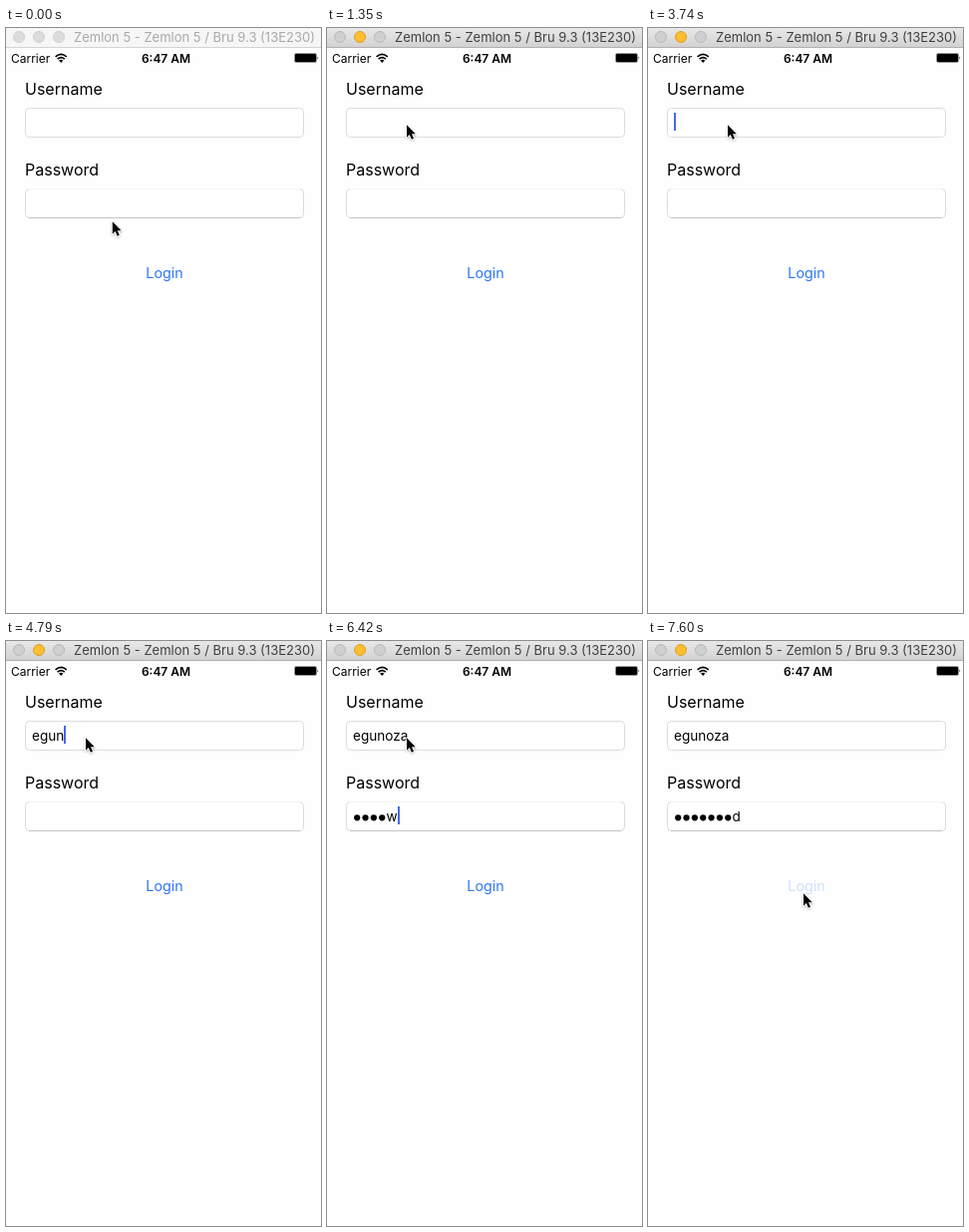
These frames come from a looping animation (316x587 px, 8000 ms). An HTML page:

```html
<!DOCTYPE html>
<html lang="en">
<head>
<meta charset="utf-8">
<title>Login form</title>
<style>
  html, body { margin: 0; width: 100%; height: 100%; overflow: hidden; background: #fefefe; }
  svg { display: block; width: 316px; height: 587px; font-family: Inter, Roboto, sans-serif; }
  text { white-space: pre; }
  .label { font-size: 16px; }
  .input { font-size: 13.6px; }
  .status { font-size: 12px; }
  .field { fill: #fff; stroke: #dcdcdc; }
  .bar-line { fill: #d3d3d3; }
  .title { font-size: 13px; fill: #a9a9a9; }
  .light { fill: #dcdcdc; stroke: #cecece; }
  .active .bar { fill: url(#barFill); }
  .active .bar-line { fill: #b1b1b1; }
  .active .title { fill: #404040; }
  .active .light { fill: #d0d0d0; stroke: #b9b9b9; }
  .active .minimise { fill: #fdbe30; stroke: #dfa023; }
</style>
</head>
<body>
<svg viewBox="0 0 316 587">
  <defs>
    <linearGradient id="barFill" x2="0" y2="1">
      <stop offset="0" stop-color="#e8e8e8"/>
      <stop offset="1" stop-color="#d1d1d1"/>
    </linearGradient>
    <filter id="shadow" x="-50%" y="-50%" width="200%" height="200%">
      <feDropShadow dx="0" dy="1" stdDeviation=".8" flood-opacity=".3"/>
    </filter>
  </defs>
  <rect width="316" height="587" fill="#fefefe"/>

  <g id="window">
    <rect class="bar" width="316" height="20" fill="#f6f6f6"/>
    <rect class="bar-line" y="19" width="316" height="1"/>
    <circle class="light" cx="13" cy="9" r="5.5"/>
    <circle class="light minimise" cx="33" cy="9" r="5.5"/>
    <circle class="light" cx="53" cy="9" r="5.5"/>
    <text class="title" x="68" y="14">Zemlon 5 - Zemlon 5 / Bru 9.3 (13E230)</text>
  </g>

  <g class="status">
    <text x="5" y="34.5">Carrier</text>
    <text x="160.5" y="34.5" text-anchor="middle" font-weight="600">6:47 AM</text>
    <g fill="none" stroke="#000" stroke-width="1.6">
      <path d="M49.6 28.8Q55.2 23.8 60.8 28.8M51.6 31.2Q55.2 28 58.8 31.2"/>
      <path d="M53 32.6Q55.2 30.8 57.4 32.6L55.2 35Z" fill="#000" stroke="none"/>
    </g>
    <rect x="289.5" y="25.5" width="22" height="9" rx="1.5" fill="none" stroke="#999"/>
    <rect x="290" y="26" width="21" height="8" rx="1"/>
    <path d="M312.5 28.5q1.5 1.5 0 3z"/>
  </g>

  <text class="label" x="19" y="67">Username</text>
  <rect class="field" x="19.5" y="80.5" width="279" height="29" rx="4"/>
  <text class="label" x="19" y="148">Password</text>
  <rect class="field" x="19.5" y="161.5" width="279" height="29" rx="4"/>
  <path d="M23 161.5H295" stroke="#f4f4f4"/>
  <path d="M23 190.5H295" stroke="#c3c3c3"/>

  <text id="user" class="input" x="26" y="100"></text>
  <g id="dots"></g>
  <text id="pass" class="input" y="181"></text>
  <rect id="caret" width="2" height="18" fill="#4269ea"/>
  <text id="login" x="159" y="251" text-anchor="middle" font-size="14.3">Login</text>

  <path id="pointer" d="M0 0V12.4L2.8 9.7L4.9 14.4L7 13.4L5 8.9H8.8Z"
    stroke="#fff" stroke-width="1.5" paint-order="stroke" stroke-linejoin="round" filter="url(#shadow)"/>
</svg>

<script>
  const LOOP = 8000, TICK = 149, LEFT = 26, DOT = 8.35;

  // Moments below are counted in ticks.
  const ACTIVATE = 9, FOCUS_USER = 11, TYPE_USER = 20, FOCUS_PASS = 36, TYPE_PASS = 40, PRESS = 51;
  const KEYS = "e....<.e.gu.noza"; // one key per tick: "." waits, "<" deletes
  const SECRET = "password", SECRET_RATE = 4 / 3;

  const REST = [106.8, 194.3], NAME_FIELD = [80, 97.3], BUTTON = [156, 253.3];
  const GLIDE = 5, LEAVE_FIELD = 46;

  const $ = id => document.getElementById(id);
  const [win, user, pass, dots, caret, login, pointer] =
    ["window", "user", "pass", "dots", "caret", "login", "pointer"].map($);

  const clamp = (v, lo, hi) => Math.min(hi, Math.max(lo, v));
  const ease = p => p * p * (3 - 2 * p);

  function set(node, attrs) {
    for (const name in attrs) node.setAttribute(name, attrs[name]);
  }

  function setText(node, text) {
    if (node.textContent !== text) node.textContent = text;
  }

  for (let i = 0; i < SECRET.length - 1; i++) {
    const dot = document.createElementNS("http://www.w3.org/2000/svg", "circle");
    set(dot, { cx: LEFT + DOT * (i + .5), cy: 177.3, r: 3.1 });
    dots.append(dot);
  }

  // Name typed so far and the tick of the latest key.
  function typeName(tick) {
    let text = "", last = FOCUS_USER;
    [...KEYS].forEach((key, i) => {
      if (key === "." || TYPE_USER + i > tick) return;
      text = key === "<" ? text.slice(0, -1) : text + key;
      last = TYPE_USER + i;
    });
    return { text, last };
  }

  // Four ticks on, then fade, two off, fade back.
  function blink(age) {
    const phase = age % 8;
    return phase < 4 ? 1 : phase === 5 || phase === 6 ? 0 : .55;
  }

  function pointerAt(tick) {
    const leaving = tick > LEAVE_FIELD;
    const [from, to, start] = leaving ? [NAME_FIELD, BUTTON, LEAVE_FIELD] : [REST, NAME_FIELD, 0];
    const p = ease(clamp((tick - start) / GLIDE, 0, 1));
    return from.map((v, i) => v + (to[i] - v) * p);
  }

  function draw(t) {
    const tick = Math.floor(t / TICK);
    const name = typeName(tick);
    const typed = clamp(Math.floor((tick - TYPE_PASS + 1) * SECRET_RATE), 0, SECRET.length);
    const hidden = Math.max(0, typed - 1);
    const passStart = LEFT + DOT * hidden;

    win.classList.toggle("active", tick >= ACTIVATE);
    setText(user, name.text);
    setText(pass, SECRET.slice(hidden, typed));
    set(pass, { x: passStart });
    [...dots.children].forEach((dot, i) => set(dot, { opacity: i < hidden ? 1 : 0 }));

    const inPass = tick >= FOCUS_PASS;
    const lastPassKey = tick < TYPE_PASS ? FOCUS_PASS : Math.min(tick, TYPE_PASS + SECRET.length / SECRET_RATE - 1);
    const field = inPass ? pass : user;
    const width = field.textContent ? field.getComputedTextLength() : 0;
    const focused = tick >= FOCUS_USER && tick < PRESS;
    set(caret, {
      x: Math.round((inPass ? passStart : LEFT) + width),
      y: inPass ? 166 : 85,
      opacity: focused ? blink(tick - (inPass ? lastPassKey : name.last)) : 0
    });

    set(login, { fill: tick >= PRESS ? "#cde2fc" : "#2c76f6" });
    set(pointer, { transform: `translate(${pointerAt(tick)})` });
  }

  const origin = performance.now();
  function frame() {
    draw((performance.now() - origin) % LOOP);
    requestAnimationFrame(frame);
  }
  draw(0);
  requestAnimationFrame(frame);
</script>
</body>
</html>
```
